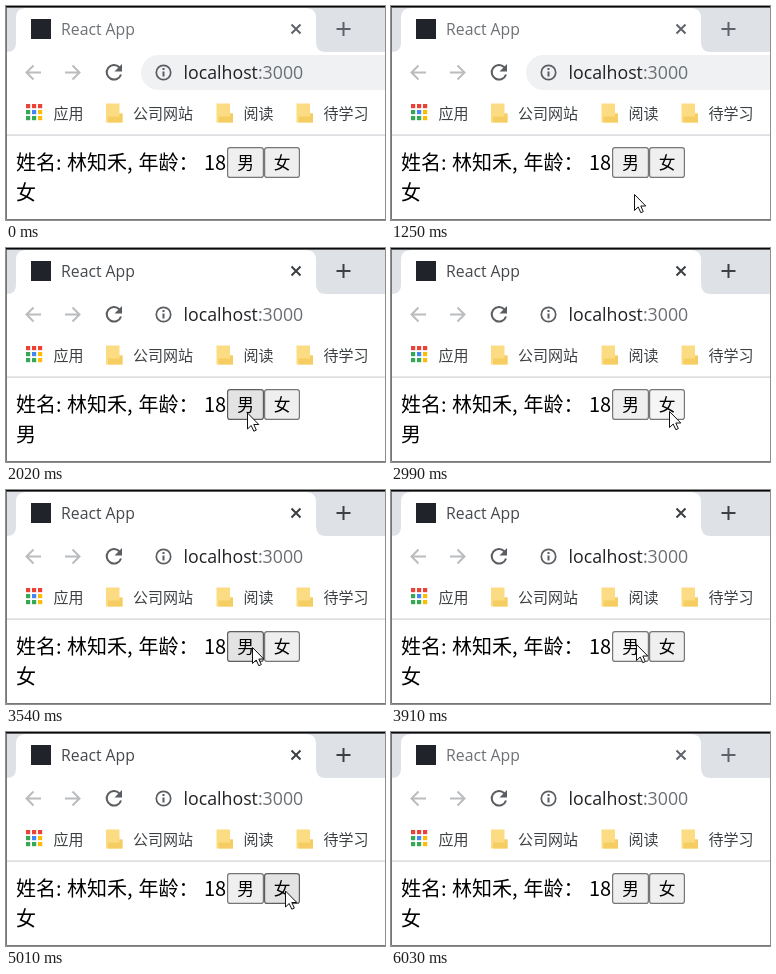
An HTML page for the animation above (6.13 s loop, 379 by 214 pixels).

```html
<!DOCTYPE html>
<html lang="zh-CN">
<head>
<meta charset="utf-8">
<title>React App</title>
<style>
html, body { margin: 0; width: 100%; height: 100%; overflow: hidden; background: #fff; }
svg { display: block; }
text { white-space: pre; font-family: "Noto Sans CJK SC", "Noto Sans CJK", sans-serif; }
.ui { font-family: "Open Sans", "Noto Sans", sans-serif; }
.line { fill: none; stroke: #5a5d61; stroke-width: 2; }
</style>
</head>
<body>
<svg width="379" height="214" viewBox="0 0 379 214">
  <rect width="379" height="214" fill="#fff"/>
  <rect width="379" height="46" fill="#dee1e6"/>
  <path d="M0 46C7 46 10 43 10 36V12Q10 2 20 2H300Q310 2 310 12V36Q310 46 320 46Z" fill="#fff"/>
  <rect width="379" height="1.6" fill="#080808"/>

  <rect x="25" y="13" width="20" height="20" fill="#20232a"/>
  <text id="title" class="ui" x="55" y="29" font-size="15.8">React App</text>
  <path id="close" class="line" d="M285.5 18.5l9 9m0-9l-9 9"/>
  <path id="plus" class="line" d="M330.5 23h14m-7-7v14"/>

  <rect id="pill" x="135" y="49" width="280" height="35" rx="17.5" fill="#eff1f2"/>
  <g class="line">
    <path d="M35 66.5H20.5m7-7l-7 7l7 7" stroke="#babcbe"/>
    <path d="M59 66.5H73.500m-7-7l7 7l-7 7" stroke="#babcbe"/>
    <path d="M113.300 61.200A7.300 7.300 0 1 0 115 68.500"/>
    <circle cx="157.500" cy="66.500" r="7.200" stroke-width="1.700"/>
    <path d="M157.500 65.500v5m0-8.500v2"/>
  </g>
  <path d="M116 58v7.500h-7.500z" fill="#5a5d61"/>
  <text class="ui" x="177.500" y="73" font-size="17.750" fill="#202124">localhost<tspan fill="#6b6f73">:3000</tspan></text>

  <g id="marks" font-size="15" fill="#3c4043"></g>
  <rect y="128.500" width="379" height="1.200" fill="#cfd1d4"/>

  <g font-size="20" fill="#000">
    <text x="10" y="163.500">姓名:</text>
    <text x="61" y="163.500">林知禾,</text>
    <text x="132.500" y="163.500">年龄：</text>
    <text x="198" y="163.500">18</text>
    <text id="sex" x="10" y="193.500"></text>
  </g>
  <g id="buttons" font-size="16.700" text-anchor="middle"></g>

  <path d="M.5 2V213.500H379" fill="none" stroke="#777"/>
  <path id="cursor" d="M.5 .5V16.500L4.200 13L6.800 18.700L9.300 17.600L6.800 12H11.800Z" fill="#fff" stroke="#111" stroke-width="1"/>
</svg>
<script>
const LOOP = 6130;
const $ = id => document.getElementById(id);

function add(parent, tag, attrs, text) {
  const el = document.createElementNS("http://www.w3.org/2000/svg", tag);
  for (const k in attrs) el.setAttribute(k, attrs[k]);
  if (text) el.textContent = text;
  return parent.appendChild(el);
}

// Bookmarks bar
const marks = $("marks");
["#ea4335", "#ea4335", "#ea4335", "#34a853", "#4285f4", "#fbbc05", "#34a853", "#34a853", "#fbbc05"]
  .forEach((fill, i) => add(marks, "rect", {
    x: 20 + i % 3 * 6, y: 98 + Math.floor(i / 3) * 6, width: 4.2, height: 4.2, fill
  }));
add(marks, "text", { x: 47.5, y: 113 }, "应用");
[[100, "公司网站"], [210.5, "阅读"], [290.5, "待学习"]].forEach(([x, label]) => {
  add(marks, "path", { d: `M${x} 97.500h13.500v10h3v9h-16.500z`, fill: "#fcdc83" });
  add(marks, "path", { d: `M${x + 2} 116.500v-6h11.500v-3h3v9z`, fill: "#f5cd62" });
  add(marks, "text", { x: x + 27, y: 113 }, label);
});

// Page buttons
const buttons = [[221, 37, "男"], [258, 36, "女"]].map(([x, w, label]) => {
  const box = add($("buttons"), "rect", {
    x: x + .6, y: 141.6, width: w - 1.2, height: 29.8, rx: 2.5, stroke: "#767676", "stroke-width": 1.2
  });
  add($("buttons"), "text", { x: x + w / 2, y: 163 }, label);
  return { label, box };
});

// Pointer stops: [time, x, y, hovered button]
const stops = [
  [0], [280, 213, 213], [580, 211, 211], [710],
  [980, 245, 207], [1110, 244, 200], [1250, 243, 188], [1370, 242, 176],
  [1500, 243, 166, "男"], [1640, 241, 164.5, "男"], [2450, 253, 163, "男"],
  [2590, 278, 163, "女"], [3540, 246, 157, "男"], [3660, 245, 154, "男"],
  [4340, 264, 157, "女"], [4460, 279, 158.5, "女"], [5320, 314, 195], [5440]
];
// Clicks: [press, release, button]
const clicks = [[1890, 2020, "男"], [2990, 3110, "女"], [3910, 4070, "男"], [4730, 5010, "女"]];

function draw(t) {
  const [, x, y, hover] = stops.filter(s => s[0] <= t).pop();
  const cursor = $("cursor");
  cursor.style.display = x === undefined ? "none" : "";
  if (x !== undefined) cursor.setAttribute("transform", `translate(${x} ${y})`);

  const done = clicks.filter(c => c[1] <= t).pop();
  $("sex").textContent = done ? done[2] : "女";

  const down = clicks.find(c => c[0] <= t && t < c[1]);
  for (const { label, box } of buttons) {
    const pressed = down && down[2] === label;
    box.setAttribute("fill", pressed ? "#f5f5f5" : hover === label ? "#e3e3e4" : "#efefef");
    box.setAttribute("stroke", hover === label && !pressed ? "#5e5e5e" : "#767676");
  }

  const active = t >= 1890 && t < 6030;
  $("title").setAttribute("fill", active ? "#45494d" : "#6d7175");
  $("close").setAttribute("stroke", active ? "#3c4043" : "#5f6368");
  $("close").style.stroke = active ? "#3c4043" : "#5f6368";
  $("plus").style.stroke = active ? "#3c4043" : "#5f6368";
  $("pill").style.display = t < 1890 ? "" : "none";
}

const start = performance.now();
function tick() {
  draw((performance.now() - start) % LOOP);
  requestAnimationFrame(tick);
}
draw(0);
requestAnimationFrame(tick);
</script>
</body>
</html>
```
